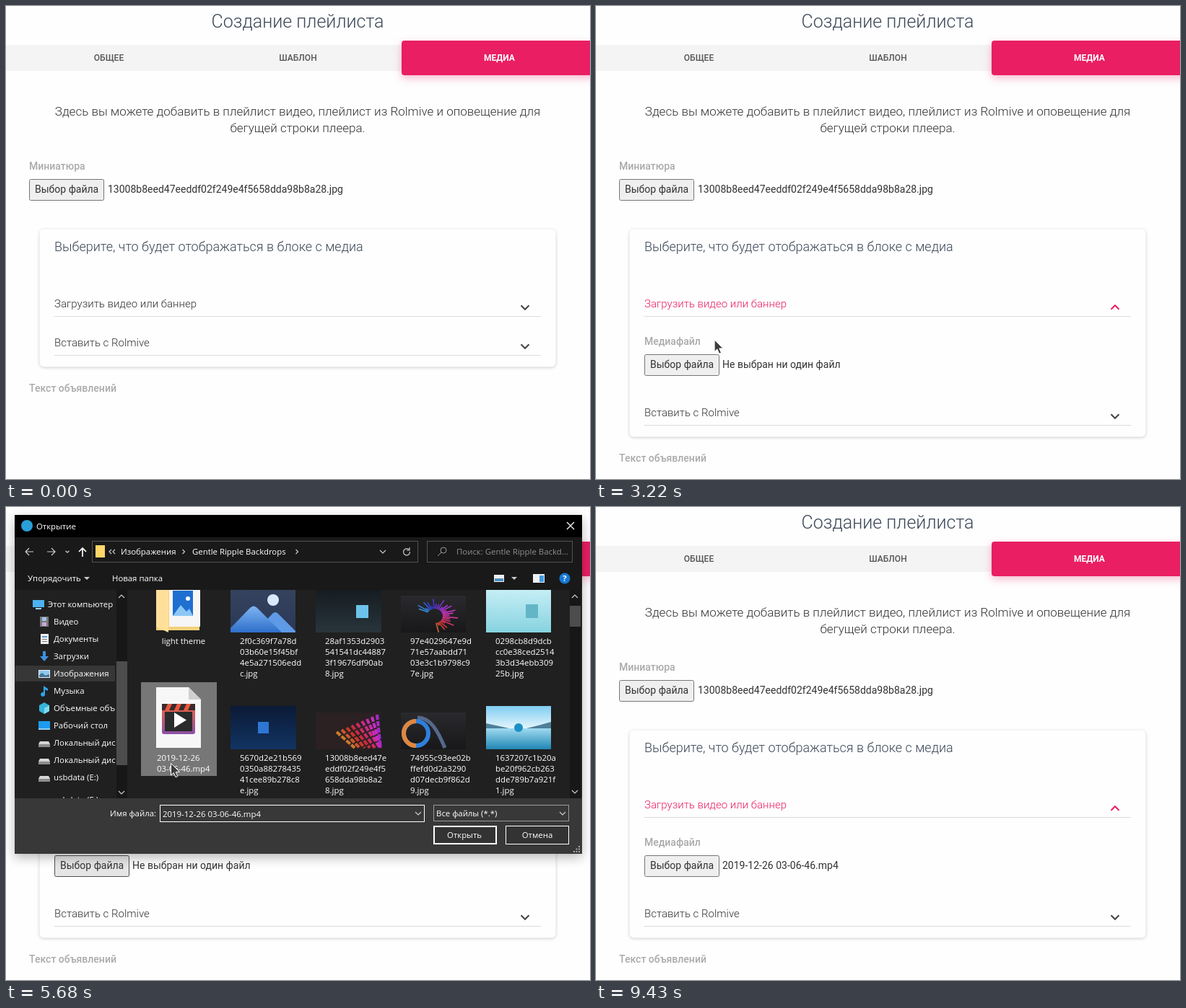
An HTML page for the animation above (9.46 s loop, 809 px wide and 656 px high).

```html
<!DOCTYPE html>
<html lang="ru">
<head>
<meta charset="utf-8">
<title>Создание плейлиста</title>
<style>
html, body { margin: 0; width: 100%; height: 100%; overflow: hidden; background: #fefefe; }
svg { display: block; width: 809px; height: 656px; }
text { white-space: pre; }
.page { font: 400 14px Roboto, sans-serif; }
.light { font-weight: 300; }
.muted { fill: #aaa; font-weight: 500; }
.dialog { font: 400 11.4px "Open Sans", "Noto Sans", sans-serif; fill: #fff; }
.line { fill: none; stroke-width: 2; }
.thin { fill: none; stroke: #ccc; stroke-width: 1.2; }
</style>
</head>
<body>
<svg id="stage" viewBox="0 0 809 656" xmlns="http://www.w3.org/2000/svg"></svg>
<script>
const LOOP = 9460;
const SERVICE = 'Rolmive';
const FOLDER = 'Gentle Ripple Backdrops';
const OPEN_SHIFT = 97;

// Markup helpers
const text = (x, y, s, attrs = '') => `<text x="${x}" y="${y}" ${attrs}>${s}</text>`;
const mid = (x, y, s, attrs = '') => text(x, y, s, `text-anchor="middle" ${attrs}`);
const rect = (x, y, w, h, fill, attrs = '') =>
  `<rect x="${x}" y="${y}" width="${w}" height="${h}" fill="${fill}" ${attrs}/>`;
const box = (x, y, w, h, fill, stroke, attrs = '') =>
  rect(x + .5, y + .5, w - 1, h - 1, fill, `stroke="${stroke}" ${attrs}`);
const path = (d, attrs) => `<path d="${d}" ${attrs}/>`;
const circle = (x, y, r, fill, attrs = '') => `<circle cx="${x}" cy="${y}" r="${r}" fill="${fill}" ${attrs}/>`;
const group = (body, attrs = '') => `<g ${attrs}>${body}</g>`;
const clip = (id, x, y, w, h) => `<clipPath id="${id}">${rect(x, y, w, h, '#000')}</clipPath>`;
const gradient = (id, from, to) => `<linearGradient id="${id}" x2="0" y2="1">
  <stop stop-color="${from}"/><stop offset="1" stop-color="${to}"/></linearGradient>`;
const chevron = (x, y, r = 4, attrs = 'class="thin"') =>
  path(`M${x - r} ${y - r / 2}l${r} ${r}l${r} ${-r}`, attrs);
const chevronUp = (x, y) => path(`M${x - 4} ${y + 2}l4 -4l4 4`, 'class="thin"');
const chevronRight = (x, y) => path(`M${x - 1.5} ${y - 3}l3 3l-3 3`, 'class="thin"');

const defs = `<defs>
  ${clip('side', 13, 115, 139, 289)}${clip('list', 169, 115, 612, 289)}
  <clipPath id="panel"><rect id="panelClip" x="47" y="431" width="714" height="0"/></clipPath>
  ${gradient('dusk', '#35435f', '#2a3856')}${gradient('hill', '#7db4f0', '#2f6fcb')}
  ${gradient('slate', '#161d22', '#28343b')}${gradient('aqua', '#c5eef5', '#86d3e0')}
  ${gradient('navy', '#0b1a35', '#123463')}${gradient('sky', '#7fcdf2', '#e4f5fc')}
  ${gradient('water', '#9fdaf0', '#1f86b4')}
  ${gradient('clip', '#f0643c', '#8b4fa8')}${gradient('dark', '#2a2a2e', '#18181a')}
  <filter id="blur" x="-10%" y="-10%" width="120%" height="120%"><feGaussianBlur stdDeviation="8"/></filter>
</defs>`;

function fileButton(x, y, id) {
  return box(x, y, 104, 30, '#efefef', '#767676', `rx="2" id="${id}"`) + text(x + 8, y + 19, 'Выбор файла');
}

function page() {
  const shadow = 'style="filter:drop-shadow(0 1px 2px rgba(0,0,0,.2))"';
  const pinkShadow = 'style="filter:drop-shadow(0 4px 6px rgba(233,30,99,.3))"';
  const rule = y => rect(67, y, 674, 1, '#dcdcdc');
  const rowChevron = (id, y) =>
    path('M-5.5 -2.7L0 2.8L5.5 -2.7', `id="${id}" class="line" stroke="#444" transform="translate(719 ${y})"`);
  return group(`
    ${mid(404, 30, 'Создание плейлиста', 'class="light" font-size="25" fill="#3c4858"')}
    ${rect(0, 54, 809, 36, '#f4f4f4')}
    ${rect(548, 48, 270, 48, '#e91e63', `rx="4" ${pinkShadow}`)}
    <g font-size="12" font-weight="500" fill="#555">
      ${mid(142.5, 76, 'ОБЩЕЕ')}${mid(404.5, 76, 'ШАБЛОН')}
      ${mid(683.5, 76, 'МЕДИА', 'fill="#fff" font-weight="700"')}
    </g>
    <g class="light" font-size="17">
      ${mid(404, 152, `Здесь вы можете добавить в плейлист видео, плейлист из ${SERVICE} и оповещение для`)}
      ${mid(404, 175, 'бегущей строки плеера.')}
    </g>
    ${text(32, 227, 'Миниатюра', 'class="muted"')}
    ${fileButton(32, 240, 'thumbButton')}
    ${text(141, 259, '13008b8eed47eeddf02f249e4f5658dda98b8a28.jpg')}
    ${rect(46.5, 309.5, 715, 191, '#fefefe', `id="card" rx="6" ${shadow}`)}
    ${text(67, 340, 'Выберите, что будет отображаться в блоке с медиа', 'class="light" font-size="18" fill="#3c4858"')}
    ${text(67, 418, 'Загрузить видео или баннер', 'id="uploadTitle" class="light" font-size="15"')}
    ${rule(430)}${rowChevron('uploadChevron', 418)}
    <g clip-path="url(#panel)"><g id="panelBody">
      ${text(67, 470, 'Медиафайл', 'class="muted"')}
      ${fileButton(67, 483, 'mediaButton')}
      ${text(175, 502, '', 'id="mediaName"')}
    </g></g>
    <g id="lower">
      ${text(67, 472, `Вставить с ${SERVICE}`, 'class="light" font-size="15"')}
      ${rule(484)}${rowChevron('insertChevron', 472)}
      ${text(32, 535, 'Текст объявлений', 'class="muted"')}
    </g>`, 'class="page" fill="#333"');
}

// Small icons, each drawn inside a 16 by 16 square
const icons = {
  computer: rect(0, 2, 16, 10, '#4db2f0') + rect(4, 13, 8, 2, '#9ad4f7'),
  film: rect(2, 1, 12, 14, '#777') + rect(5, 2, 6, 5, '#9fc5e8') + rect(5, 9, 6, 5, '#c9a7dc'),
  page: rect(3, 1, 11, 14, '#f2f2f2') + rect(5, 4, 7, 2, '#5b9bd5') + rect(5, 8, 7, 1, '#777') + rect(5, 11, 7, 1, '#777'),
  down: path('M6 1h4v7h4l-6 7l-6 -7h4z', 'fill="#3f93e0"'),
  image: rect(0, 3, 16, 11, '#eee') + rect(1, 4, 14, 5, '#8cc7ee') + path('M1 13v-3l4 -3l4 3l6 -1v4z', 'fill="#40779c"'),
  note: path('M7 1l6 4v3l-4 -2v6a3 3 0 1 1 -2 -2z', 'fill="#2fa4ee"'),
  cube: path('M8 0l7 4v8l-7 4l-7 -4v-8z', 'fill="#35b4d8"') + path('M8 8l7 -4v8l-7 4z', 'fill="#7fdcee"'),
  desktop: rect(0, 2, 16, 12, '#1d9bf0') + rect(0, 12, 16, 2, '#8fd0fa'),
  disk: path('M2 6h12l2 4v4h-16v-4z', 'fill="#d6d6d6"') + rect(0, 10, 16, 4, '#8c8c8c'),
};

function sidebar() {
  const rows = [['computer', 'Этот компьютер'], ['film', 'Видео'], ['page', 'Документы'], ['down', 'Загрузки'],
    ['image', 'Изображения'], ['note', 'Музыка'], ['cube', 'Объемные объекты'], ['desktop', 'Рабочий стол'],
    ['disk', 'Локальный диск'], ['disk', 'Локальный диск'], ['disk', 'usbdata (E:)'], ['', 'usbdata (E:)']];
  const body = rows.map(([icon, label], i) => {
    const x = i ? 45 : 37, y = 127 + i * 24 + (i === 11 ? 7 : 0);
    return group(icons[icon] || '', `transform="translate(${x} ${y})"`) + text(x + 21, y + 12, label);
  }).join('');
  return group(rect(13, 220, 138, 22, '#373737') + body, 'clip-path="url(#side)"')
    + rect(153, 115, 15, 289, '#171717') + rect(153, 214, 15, 144, '#4d4d4d')
    + chevronUp(160, 124) + chevron(160, 396);
}

function fan() {
  let out = '';
  for (let i = 0; i < 26; i++) {
    const a = -2.6 + i * .16, r = 19 + 5 * Math.sin(i * 2.3), c = Math.cos(a), s = Math.sin(a);
    out += path(`M${594 + 11 * c} ${151 + 10 * s}L${594 + r * 1.35 * c} ${151 + r * s}`,
      `stroke="hsl(${205 + i * 7} 65% 52%)" stroke-width="1.6"`);
  }
  return out;
}

function stripes() {
  let out = '';
  for (let i = 0; i < 9; i++) {
    const x = 458 + i * 7;
    out += path(`M${x} ${312 - i * 3}L${Math.min(519, x + 25)} 334`,
      `stroke="hsl(${30 - i * 13} 65% 48%)" stroke-width="4" stroke-dasharray="7 2"`);
  }
  return out;
}

function fileList() {
  const names = [
    [324, 190, '2f0c369f7a78d 03b60e15f45bf 4e5a271506edd c.jpg'],
    [442, 190, '28af1353d2903 541541dc44887 3f19676df90ab 8.jpg'],
    [560, 190, '97e4029647e9d 71e57aabdd71 03e3c1b9798c9 7e.jpg'],
    [678, 190, '0298cb8d9dcb cc0e38ced2514 3b3d34ebb309 25b.jpg'],
    [209, 352, '2019-12-26 03-06-46.mp4'],
    [324, 352, '5670d2e21b569 0350a88278435 41cee89b278c8 e.jpg'],
    [442, 352, '13008b8eed47e eddf02f249e4f5 658dda98b8a2 8.jpg'],
    [560, 352, '74955c93ee02b ffefd0d2a3290 d07decb9f862d 9.jpg'],
    [678, 352, '1637207c1b20a be20f962cb263 dde789b7a921f 1.jpg'],
  ];
  const labels = names.map(([x, y, s]) => s.split(' ').map((row, i) => text(x, y + 15 * i, row)).join('')).join('');
  const folder = rect(208, 105, 60, 66, '#f3d27a') + rect(226, 108, 43, 58, '#f6f6f6')
    + rect(231, 116, 28, 35, '#1e6fd0') + path('M231 151l11 -15l8 9l4 -4l5 10z', 'fill="#8cc7f5"')
    + circle(252, 127, 3, '#fff') + path('M208 105l17 8v61l-17 -8z', 'fill="#ffe09a"');
  const video = path('M208 250h45l17 17v67h-62z', 'fill="#f7f7f7"') + path('M253 250l17 17h-17z', 'fill="#d0d0d0"')
    + rect(216, 273, 46, 42, 'url(#clip)', 'rx="3"') + rect(216, 273, 46, 9, '#3a2a2c')
    + path('M224 273h6l-4 9h-6zM237 273h6l-4 9h-6zM250 273h6l-4 9h-6z', 'fill="#e8583c"')
    + rect(220, 284, 38, 27, '#2b2b2b') + path('M233 285l17 10.5l-17 10.5z', 'fill="#fff"');
  const pictures = rect(311, 115, 90, 59, 'url(#dusk)') + circle(370, 129, 8, '#dbe8fb')
    + path('M345 174l24 -26q4 -4 8 0l24 24v2z', 'fill="#5f9ae6"')
    + path('M311 168l27 -28q5 -5 10 0l34 34h-71z', 'fill="url(#hill)"')
    + rect(429, 115, 91, 59, 'url(#slate)') + rect(485, 136, 17, 18, '#6cc3ea')
    + rect(547, 123, 90, 51, 'url(#dark)') + fan()
    + rect(665, 115, 90, 59, 'url(#aqua)') + rect(720, 135, 17, 19, '#62b6c6')
    + rect(311, 276, 91, 60, 'url(#navy)') + rect(349, 298, 15, 16, '#2d76d2')
    + rect(429, 285, 90, 51, '#2b2122') + stripes()
    + rect(547, 285, 90, 51, 'url(#dark)')
    + path('M570 292c18 0 28 18 38 42', 'fill="none" stroke="#55698c" stroke-width="5"')
    + circle(568, 314, 17, 'none', 'stroke="#2e80dc" stroke-width="6"')
    + path('M568 331a17 17 0 0 1 0 -34', 'fill="none" stroke="#e0873f" stroke-width="6"')
    + rect(665, 276, 90, 31, 'url(#sky)') + rect(665, 307, 90, 29, 'url(#water)')
    + path('M665 300l14 3l18 4h-32zM755 298l-14 4l-20 5h34z', 'fill="#4c7f99"') + circle(710, 306, 6, '#1d8fc4');
  return group(`${folder}${mid(246, 190, 'light theme')}
    ${rect(187, 243, 105, 130, '#777', 'id="fileCell"')}${video}${pictures}${labels}`, 'clip-path="url(#list)"')
    + rect(781, 115, 15, 289, '#171717') + rect(781, 137, 15, 29, '#4d4d4d')
    + chevronUp(788, 124) + chevron(788, 395);
}

function toolbar() {
  const arrow = (x, d) => path(`M${x} 62h${11 * d}M${x} 62l${5 * d} -5M${x} 62l${5 * d} 5`, 'class="thin"');
  const arrows = arrow(27, 1) + path('M57 62h11M63 57l5 5l-5 5', 'class="thin"') + chevron(85, 62, 2.5)
    + path('M106 69v-12M101 62l5 -5l5 5', 'class="thin" style="stroke:#fff;stroke-width:1.7"');
  return arrows
    + box(119, 47, 452, 30, '#191919', '#535353')
    + rect(124, 53, 13, 17, '#ffd667') + path('M146 59l-3 3l3 3M151 59l-3 3l3 3', 'class="thin"')
    + text(159, 66, 'Изображения') + chevronRight(246, 62) + text(258, 66, FOLDER) + chevronRight(403, 62)
    + chevron(522, 62) + path('M558 59a4.5 4.5 0 1 0 1.5 3M559 56v4h-4', 'class="thin"')
    + box(583, 47, 202, 30, '#191919', '#535353')
    + circle(606, 60, 4, 'none', 'stroke="#999"') + path('M603 63l-5 5', 'stroke="#999"')
    + text(624, 66, `Поиск: ${FOLDER.slice(0, 19)}...`, 'fill="#8f8f8f"')
    + text(30, 103, 'Упорядочить') + path('M108 97h8l-4 4z', 'fill="#ccc"') + text(147, 103, 'Новая папка')
    + rect(676, 94, 14, 10, '#eee') + rect(677, 99, 12, 4, '#4c90bf') + path('M700 97h8l-4 4z', 'fill="#ccc"')
    + rect(730, 93, 16, 12, '#f0f0f0') + rect(739, 95, 6, 9, '#3f9be0')
    + circle(774, 99, 7.5, '#1677d2') + mid(774, 103, '?', 'font-weight="700"');
}

function footer() {
  let grip = '';
  for (let i = 0; i < 6; i++) {
    const row = i < 1 ? 0 : i < 3 ? 1 : 2, col = i - row * (row + 1) / 2;
    grip += rect(793 - col * 3.5, 470 + row * 3.5, 2, 2, '#aaa');
  }
  return text(208, 429, 'Имя файла:', 'text-anchor="end"')
    + box(213, 413, 367, 24, '#383838', '#9b9b9b', 'id="nameInput"')
    + rect(216, 417, 137, 16, '#0078d7', 'id="nameHighlight"') + text(217, 430, '2019-12-26 03-06-46.mp4', 'id="fileName"')
    + chevron(571, 425) + box(592, 413, 188, 23, '#383838', '#9b9b9b') + text(596, 429, 'Все файлы (*.*)') + chevron(771, 425)
    + rect(593, 443, 86, 24, '#333', 'id="openButton" stroke="#fff" stroke-width="2"') + mid(635, 459, 'Открыть')
    + box(692, 442, 88, 26, '#333', '#fff') + mid(736, 459, 'Отмена') + grip;
}

function skeleton() {
  const white = [[141, 417, 66, 14], [212, 412, 368, 25], [591, 412, 189, 25], [591, 442, 88, 26], [692, 442, 89, 26], [780, 464, 18, 17]];
  return rect(12, 42, 786, 362, '#fff') + rect(152, 115, 16, 289, '#171717') + rect(152, 131, 16, 143, '#4d4d4d')
    + rect(780, 131, 17, 255, '#171717') + rect(780, 131, 17, 29, '#4d4d4d')
    + white.map(r => rect(...r, '#fff')).join('');
}

function dialog() {
  return group(`${rect(12, 16, 786, 470, '#000', 'opacity=".28" filter="url(#blur)"')}
    ${rect(12, 11, 786, 470, '#383838')}${rect(12, 11, 786, 31, '#000')}
    ${circle(29, 26, 8, '#2a9fd8', 'id="appDot"')}${text(42, 31, 'Открытие')}
    ${path('M777 21l10 10M787 21l-10 10', 'class="thin" style="stroke:#fff"')}
    ${group(skeleton(), 'id="skeleton"')}
    ${group(rect(12, 42, 786, 73, '#191919') + rect(12, 115, 786, 289, '#202020')
      + toolbar() + sidebar() + fileList() + footer(), 'id="content"')}`, 'id="dialog" class="dialog"');
}

function cursors() {
  const style = 'fill="#3c3c3c" stroke="#fff" stroke-width="1" stroke-linejoin="round"';
  return group(`
    ${path('M.5 .5V17l3.8 -3.6l2.7 6.4l2.9 -1.2l-2.7 -6.2h5.2z', `id="arrow" ${style}`)}
    ${path('M-1.5 1c0 -2 3 -2 3 0v6l8.5 2c2 .5 2.5 2 2.3 4l-1 4v4h-10.5v-3l-5.5 -6c-1 -2 1 -3 2.5 -1.5l.7 .7z', `id="hand" ${style}`)}
    ${circle(17.5, 20.5, 5.5, 'none', 'id="busy" stroke="#2f9be0" stroke-width="3"')}`, 'id="cursor"');
}

document.getElementById('stage').innerHTML = defs + page() + dialog() + cursors();
const el = {};
document.querySelectorAll('#stage [id]').forEach(node => el[node.id] = node);

// Motion tracks: [time, ...values], linear between entries
const cursorTrack = [
  [100, 803, 29], [640, 803, 29], [760, 735, 42], [900, 640, 62], [1030, 548, 90], [1150, 470, 122], [1270, 385, 150],
  [1390, 320, 190], [1480, 275, 232], [1570, 225, 286], [1720, 209, 330], [1900, 199, 377], [2080, 193, 406], [2170, 192, 412],
  [2890, 192, 412], [3050, 185, 430], [3250, 160, 468], [3450, 141, 494], [3550, 138, 498],
  [4720, 138, 498], [4900, 165, 455], [5150, 210, 390], [5350, 227, 360], [5470, 228, 355],
  [6400, 228, 355], [6610, 262, 364], [6750, 365, 392], [6900, 500, 427], [7030, 595, 449], [7120, 632, 456],
  [7200, 641, 457], [7690, 641, 457], [7840, 641, 453],
  [8830, 641, 453], [8920, 658, 420], [9010, 682, 360], [9100, 706, 300], [9190, 726, 250], [9280, 753, 200], [9360, 783, 145], [9425, 806, 92],
];
const dialogTrack = [[4230, 0, .95], [4390, .27, .963], [4540, .27, .963], [4690, 1, 1], [7930, 1, 1], [8050, .2, .96], [8120, 0, .95]];
const expandTrack = [[2170, 0, 0], [2230, 9, 60], [2440, 9, 60], [2500, 46, 130], [2560, 72, 172], [2620, 88, 180], [2710, OPEN_SHIFT, 180]];

function sample(track, t) {
  if (t <= track[0][0]) return track[0].slice(1);
  const i = track.findIndex(key => key[0] > t);
  if (i < 0) return track[track.length - 1].slice(1);
  const a = track[i - 1], b = track[i], k = (t - a[0]) / (b[0] - a[0]);
  return a.slice(1).map((v, n) => v + (b[n + 1] - v) * k);
}

const set = (id, name, value) => el[id].setAttribute(name, value);
const show = (id, on) => set(id, 'visibility', on ? 'inherit' : 'hidden');

function render(t) {
  const within = (a, b) => t >= a && t < b;

  const [shift, turn] = sample(expandTrack, t);
  const accent = t >= 2200 ? '#e91e63' : '#333';
  set('card', 'height', 191 + shift);
  set('lower', 'transform', `translate(0 ${shift})`);
  set('panelClip', 'height', shift);
  set('panelBody', 'opacity', Math.max(0, (shift - 9) / (OPEN_SHIFT - 9)));
  set('uploadTitle', 'fill', accent);
  set('uploadChevron', 'stroke', t >= 2200 ? accent : '#444');
  set('uploadChevron', 'transform', `translate(719 418) rotate(${turn})`);
  const hover = within(3400, 7930);
  set('mediaButton', 'fill', within(3700, 3790) ? '#f5f5f5' : hover ? '#e5e5e5' : '#efefef');
  set('mediaButton', 'stroke', hover ? '#4f4f4f' : '#767676');
  el.mediaName.textContent = t < 7960 ? 'Не выбран ни один файл' : '2019-12-26 03-06-46.mp4';

  const [alpha, scale] = sample(dialogTrack, t);
  show('dialog', alpha > 0);
  set('dialog', 'opacity', alpha);
  set('dialog', 'transform', `translate(404.5 246) scale(${scale}) translate(-404.5 -246)`);
  show('skeleton', t < 4600);
  show('content', t >= 4600);
  show('appDot', t < 7930);
  show('fileCell', t >= 5200);
  set('fileCell', 'fill', t < 5500 ? '#4d4d4d' : '#777');
  set('nameInput', 'stroke', t < 5710 ? '#fff' : '#9b9b9b');
  show('fileName', t >= 5500);
  show('nameHighlight', t >= 7900);
  set('openButton', 'fill', within(7690, 7840) ? '#666' : '#333');

  const [x, y] = sample(cursorTrack, t);
  const overTitle = within(1960, 3060);
  show('cursor', within(100, 9425));
  set('cursor', 'transform', `translate(${x} ${y})`);
  show('arrow', !overTitle);
  show('hand', overTitle);
  show('busy', within(3820, 4240));
}

const start = performance.now();
function tick() {
  render((performance.now() - start) % LOOP);
  requestAnimationFrame(tick);
}
tick();
</script>
</body>
</html>
```
